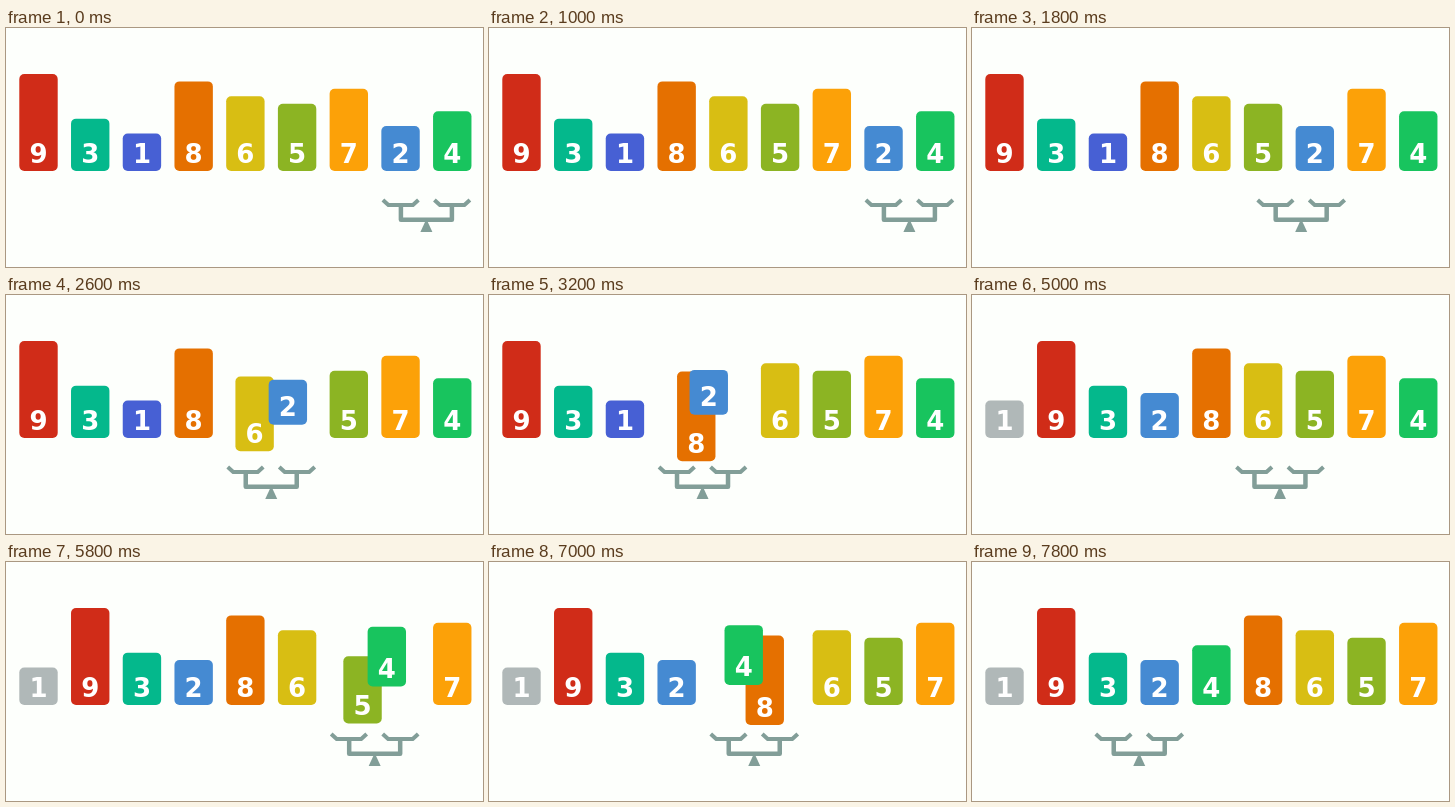
Write an HTML page with a canvas that moves like this. It is 477 by 239 pixels and loops after 8000 ms.

```html
<!DOCTYPE html>
<html lang="en">
<head>
<meta charset="utf-8">
<title>Bubble sort</title>
<style>
  html, body { margin: 0; width: 100%; height: 100%; overflow: hidden; background: #fdfffc; }
  canvas { display: block; }
</style>
</head>
<body>
<canvas id="stage" width="477" height="239"></canvas>
<script>
const ctx = document.getElementById('stage').getContext('2d');

const LOOP = 8000, TICK = 200;
const FIRST_MOVE = 1008, MOVE = 394, RETURN = 318, LAST_CHECK = 456, SWAP = 180;
const SLOT = 51.72, FIRST_X = 32.5, BASE = 143, LIFT = 25;
const VALUES = [9, 3, 1, 8, 6, 5, 7, 2, 4];
const COLORS = ['#4760d4', '#458ad2', '#04b88c', '#18c45e', '#8cb423',
                '#d8be13', '#fca108', '#e57000', '#d02c18'];
const SORTED = '#b0b8b8', SCALE = '#829e98';

// Pairs weighed in turn (index of the left bar) and the time the scale takes to get there.
const STEPS = [
  ...[6, 5, 4, 3, 2, 1, 0].map(pair => [pair, MOVE]),
  [7, RETURN],
  ...[6, 5, 4].map(pair => [pair, MOVE]),
  [3, LAST_CHECK], [2, MOVE]
];

const clamp = v => Math.max(0, Math.min(1, v));
const easeOut = u => Math.sin(u * Math.PI / 2);
const easeInOut = u => (1 - Math.cos(u * Math.PI)) / 2;
const slotX = i => FIRST_X + SLOT * i;

function stateAt(t) {
  const order = [...VALUES];
  let scale = 7, clock = FIRST_MOVE, sorted = 0;
  for (const [pair, duration] of STEPS) {
    if (t < clock) break;
    scale += (pair - scale) * easeOut(clamp((t - clock) / duration));
    clock += duration;
    if (t < clock) break;
    if (order[pair] > order[pair + 1]) {
      const progress = easeInOut(clamp((t - clock) / SWAP));
      clock += SWAP;
      if (t < clock) return { order, scale, sorted, pair, progress };
      [order[pair], order[pair + 1]] = [order[pair + 1], order[pair]];
    }
    if (pair === sorted) sorted++;
  }
  return { order, scale, sorted, pair: -1, progress: 0 };
}

function drawBar(value, x, dy, color) {
  const height = 30 + 7.45 * value;
  ctx.fillStyle = color;
  ctx.beginPath();
  ctx.roundRect(x - 19.2, BASE - height + dy, 38.4, height, 5);
  ctx.fill();
  ctx.fillStyle = '#fff';
  ctx.fillText(value, x, BASE - 8.5 + dy);
}

const pans = new Path2D(
  'M-43.5 172l5.5 5h24.5l5.5-5M43.5 172l-5.5 5h-24.5l-5.5-5');
const beam = new Path2D('M-25.5 177V191.7H25.5V177');
const foot = new Path2D('M0 191L6 204H-6Z');

function drawScale(x) {
  ctx.save();
  ctx.translate(x, 0);
  ctx.strokeStyle = ctx.fillStyle = SCALE;
  ctx.lineJoin = 'round';
  ctx.lineWidth = 4;
  ctx.stroke(pans);
  ctx.lineWidth = 4.5;
  ctx.stroke(beam);
  ctx.fill(foot);
  ctx.restore();
}

function draw(t) {
  const { order, scale, sorted, pair, progress } = stateAt(t);
  ctx.fillStyle = '#fdfffc';
  ctx.fillRect(0, 0, 477, 239);
  ctx.font = 'bold 26px "DejaVu Sans", sans-serif';
  ctx.textAlign = 'center';
  drawScale(slotX(scale + 0.5));
  order.forEach((value, i) => {
    const direction = pair < 0 ? 0 : i === pair ? 1 : i === pair + 1 ? -1 : 0;
    const dy = direction * LIFT * Math.sin(Math.PI * progress);
    const color = i < sorted ? SORTED : COLORS[value - 1];
    drawBar(value, slotX(i + direction * progress), dy, color);
  });
}

function frame() {
  const t = performance.now() % LOOP;
  draw(Math.floor(t / TICK) * TICK);
  requestAnimationFrame(frame);
}
frame();
</script>
</body>
</html>
```
